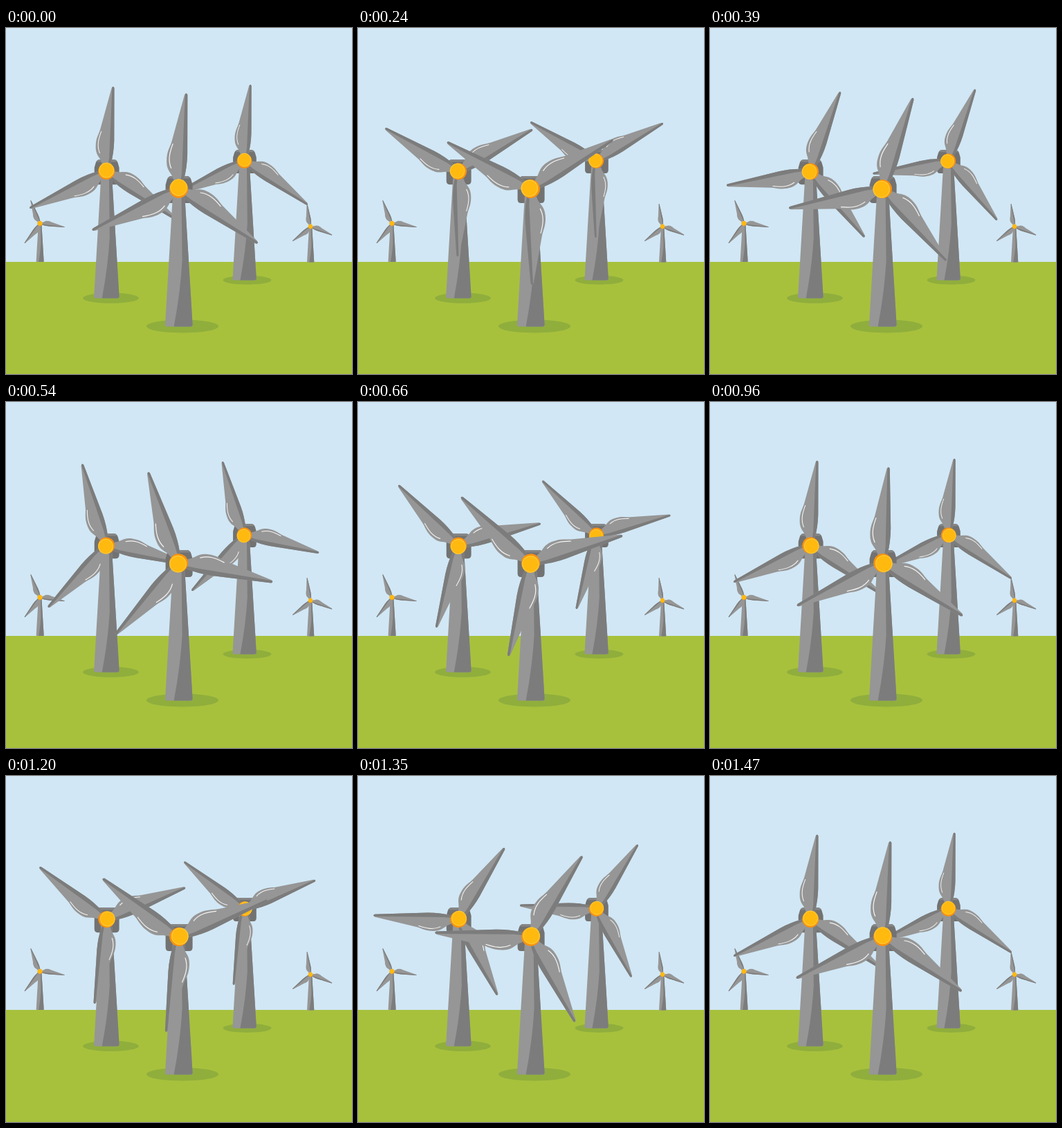
Write an HTML page that moves like this. It is 500 px wide and 500 px high and loops after 1.5 s.

```html
<!DOCTYPE html>
<html lang="en">
<head>
<meta charset="utf-8">
<title>Wind turbines</title>
<style>
  html, body { margin: 0; width: 100%; height: 100%; overflow: hidden; background: #d1e7f5; }
  svg { display: block; width: 100%; height: 100%; }
</style>
</head>
<body>
<svg viewBox="0 0 500 500">
  <defs>
    <g id="blade">
      <path fill="#969696" d="M-7 -12C-10 -24 -17.500 -25 -17.500 -40C-17.500 -55 -12.500 -60 -10 -69L8.300 -135.500Q10.500 -140 12.700 -136L12.500 -50Q12 -30 7 -12Z"/>
      <path fill="#7c7c7c" d="M9.300 -137Q11.500 -139.500 12.700 -136L12.500 -50Q12 -30 7 -12L3 -12L4.500 -24Z"/>
    </g>
    <path id="shine" fill="none" stroke="#f4f4f4" stroke-width="1.2" stroke-linecap="round" d="M-8.500 -65C-13 -53 -16 -42 -11 -30"/>
    <g id="hub" transform="translate(0 -1)">
      <circle cy=".8" r="13.5" fill="#f7920f"/>
      <circle cy="-.9" r="12.4" fill="#ffb90f"/>
      <circle cy="-.9" r="11.6" fill="none" stroke="#ffc83a" stroke-width="1.2"/>
    </g>
    <g id="housing">
      <path fill="#727272" d="M-11 -17.500H12Q16.500 -17.500 18 -12L20 -5V16Q20 21.500 15 21.500H-14Q-19 21.500 -19 16V-5L-17 -12Q-15.500 -17.500 -11 -17.500Z"/>
      <path fill="#868686" d="M-11 -17.500H12Q15 -17.500 16.500 -14H-15.500Q-14 -17.500 -11 -17.500Z"/>
    </g>
    <g id="tower">
      <path fill="#969696" d="M-8.500 8H8.500L20 197Q20 200 17 200H-17Q-20 200 -19.600 197Z"/>
      <path fill="#7c7c7c" d="M4 8H8.500L20 197Q20 200 17 200H-7Q2.500 150 5 105Z"/>
    </g>
  </defs>
  <rect width="500" height="500" fill="#d1e7f5"/>
  <rect y="338" width="500" height="162" fill="#a7c13d"/>
  <g id="scene"></g>
</svg>
<script>
  const STEP = 30, LOOP = 1500, LAST = 49;

  // knee: the step at which the first third of a turn is done
  const turbines = [
    { x: 49.1, y: 282.3, size: .26, mast: .278, angle: -26.4 },
    { x: 440.1, y: 286.8, size: .241, mast: .258, angle: -13.3 },
    { x: 145.2, y: 206.4, size: .888, mast: .92, knee: 15, shadow: [151.5, 390.3, 40.5, 7.5] },
    { x: 344.5, y: 191.4, size: .8, mast: .865, knee: 15, shadow: [348.5, 364.3, 35, 6.5] },
    { x: 249.6, y: 231.5, size: 1, mast: 1, knee: 14.7, shadow: [255, 431, 52, 9.5] }
  ];

  const use = id => `<use href="#${id}"/>`;

  function rotor(shiny) {
    return [240, 120, 0].map(a =>
      `<g transform="rotate(${a})">${use('blade')}${shiny ? use('shine') : ''}</g>`
    ).join('') + use('hub');
  }

  function turbine({ x, y, size, mast, angle = 0, knee, shadow }) {
    const [cx, cy, rx, ry] = shadow || [];
    const shade = shadow
      ? `<ellipse cx="${cx}" cy="${cy}" rx="${rx}" ry="${ry}" fill="#90ae3c"/>` : '';
    return `${shade}<g transform="translate(${x} ${y})">
      <g transform="scale(${mast})">${knee ? use('housing') : ''}${use('tower')}</g>
      <g transform="scale(${size}) translate(0 1)"><g class="rotor" transform="rotate(${angle})">${rotor(knee)}</g></g>
    </g>`;
  }

  document.getElementById('scene').innerHTML = turbines.map(turbine).join('');
  const rotors = document.querySelectorAll('.rotor');

  function turn(step, knee) {
    return step < knee
      ? -120 * step / knee
      : -120 - 240 * (step - knee) / (LAST - knee);
  }

  function draw(ms) {
    const step = Math.floor((ms % LOOP) / STEP + .01);
    turbines.forEach(({ knee }, i) => {
      if (knee) rotors[i].setAttribute('transform', `rotate(${turn(Math.min(step, LAST), knee)})`);
    });
  }

  function tick() {
    draw(performance.now());
    requestAnimationFrame(tick);
  }
  tick();
</script>
</body>
</html>
```
